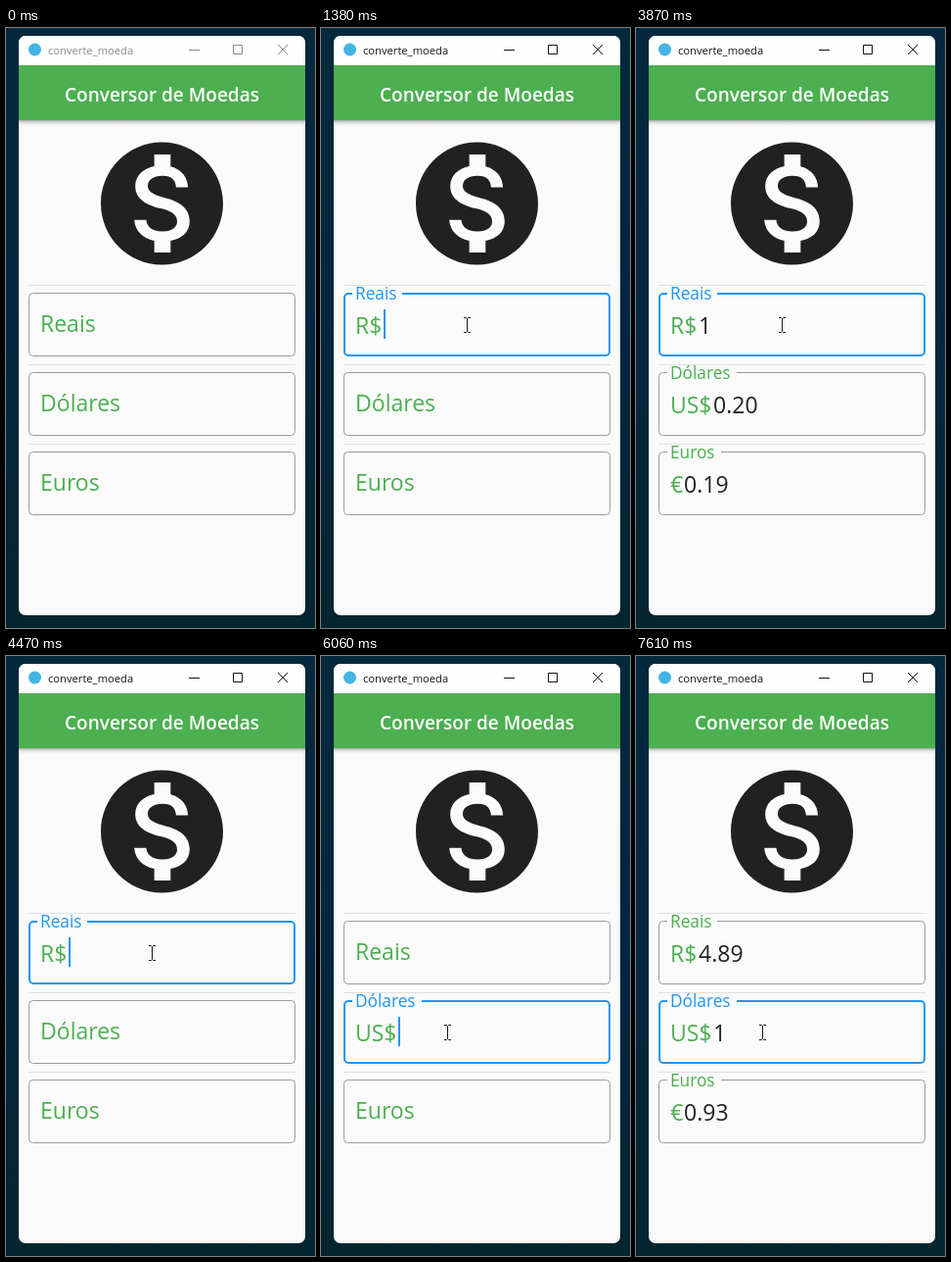
An HTML page for the animation above (8000 ms loop, 316 by 612 pixels).

```html
<!DOCTYPE html>
<html lang="pt">
<head>
<meta charset="utf-8">
<title>Conversor de Moedas</title>
<style>
  html, body { margin: 0; width: 100%; height: 100%; overflow: hidden; background: #05263b; }
  svg { display: block; width: 316px; height: 612px; }
  text { font-family: "Open Sans", "Noto Sans", sans-serif; white-space: pre; }
  .entry { font-size: 23px; }
</style>
</head>
<body>
<svg viewBox="0 0 316 612">
  <defs>
    <linearGradient id="desk" x2="0" y2="1">
      <stop stop-color="#06283c"/>
      <stop offset=".5" stop-color="#05263f"/>
      <stop offset="1" stop-color="#052530"/>
    </linearGradient>
    <linearGradient id="shade" x2="0" y2="1">
      <stop stop-color="#8a8f8a" stop-opacity=".8"/>
      <stop offset=".35" stop-color="#c0c4c0" stop-opacity=".5"/>
      <stop offset="1" stop-color="#f0f0f0" stop-opacity="0"/>
    </linearGradient>
    <clipPath id="frame"><rect x="13" y="8" width="293" height="591" rx="7"/></clipPath>
  </defs>

  <rect width="316" height="612" fill="url(#desk)"/>
  <g clip-path="url(#frame)">
    <rect x="13" y="8" width="293" height="591" fill="#fafafa"/>
    <rect x="13" y="8" width="293" height="30" fill="#fefefe"/>
    <rect x="13" y="38" width="293" height="56" fill="#4caf50"/>
    <rect x="13" y="94" width="293" height="7" fill="url(#shade)"/>
  </g>

  <circle cx="29.5" cy="22" r="6.5" fill="#43b4e4"/>
  <g id="chrome">
    <text x="43" y="27" font-size="11.2" fill="currentColor">converte_moeda</text>
    <path d="M187 22.5h11M232.5 17.5h9v9h-9zM278 17l10 10M288 17l-10 10" fill="none" stroke="currentColor"/>
  </g>
  <text x="159.5" y="75" font-size="19" font-weight="600" text-anchor="middle" fill="#fff">Conversor de Moedas</text>

  <path transform="translate(84.5 104) scale(6.25)" fill="#212121" d="M12 2C6.48 2 2 6.48 2 12s4.48 10 10 10 10-4.48 10-10S17.52 2 12 2zm1.41 16.09V20h-2.67v-1.93c-1.71-.36-3.16-1.46-3.27-3.4h1.96c.1 1.05.82 1.87 2.65 1.87 1.96 0 2.4-.98 2.4-1.59 0-.83-.44-1.61-2.67-2.14-2.48-.6-4.18-1.62-4.18-3.67 0-1.72 1.39-2.84 3.11-3.21V4h2.67v1.95c1.86.45 2.79 1.86 2.85 3.39H14.3c-.05-1.11-.64-1.87-2.22-1.87-1.5 0-2.4.68-2.4 1.64 0 .84.65 1.39 2.67 1.91s4.18 1.39 4.18 3.91c-.01 1.83-1.38 2.83-3.12 3.16z"/>
  <path d="M23 262.5h273M23 343.5h273M23 424.5h273" stroke="#dfdfe1"/>

  <g id="fields"></g>
  <rect id="caret" width="2" height="30" fill="#2196f3"/>
  <path id="beam" d="M-3.5 -7.5h2.5l1 1 1-1h2.5M0 -6.5v13M-3.5 7.5h2.5l1-1 1 1h2.5" fill="none" stroke="#161616"/>
  <path id="arrow" d="M0 0v16l3.8-3.6 2.5 5.8 2.4-1-2.5-5.7h5.2z" fill="#fff" stroke="#111"/>
</svg>

<script>
const LOOP = 8000, FADE = 200, BLINK = 500;
const CLICK_REAIS = 1095, TYPE_REAIS = 2370, ERASE = 4260, CLICK_DOLARES = 5830, TYPE_DOLARES = 6620;
const RESETS = [CLICK_REAIS, TYPE_REAIS, ERASE, CLICK_DOLARES, TYPE_DOLARES];
const GREEN = [76, 175, 80], BLUE = [33, 150, 243], GREY = [155, 155, 159];

// raised / focused: times at which the state flips; values: [from, to, text]
const FIELDS = [
  { label: 'Reais', prefix: 'R$', top: 270, valueX: 64, gap: 51,
    raised: [CLICK_REAIS, CLICK_DOLARES, TYPE_DOLARES], focused: [CLICK_REAIS, CLICK_DOLARES],
    values: [[TYPE_REAIS, ERASE, '1'], [TYPE_DOLARES, LOOP, '4.89']] },
  { label: 'Dólares', prefix: 'US$', top: 351, valueX: 79, gap: 71,
    raised: [TYPE_REAIS, ERASE, CLICK_DOLARES], focused: [CLICK_DOLARES],
    values: [[TYPE_REAIS, ERASE, '0.20'], [TYPE_DOLARES, LOOP, '1']] },
  { label: 'Euros', prefix: '€', top: 432, valueX: 49, gap: 55,
    raised: [TYPE_REAIS, ERASE, TYPE_DOLARES], focused: [],
    values: [[TYPE_REAIS, ERASE, '0.19'], [TYPE_DOLARES, LOOP, '0.93']] }
];

const MOUSE = [[250, 318, 430], [860, 149, 303], [5120, 149, 303], [5400, 129, 384]];

const $ = id => document.getElementById(id);
const clamp = v => Math.max(0, Math.min(1, v));
const lerp = (a, b, p) => a + (b - a) * p;
const mix = (a, b, p) => `rgb(${a.map((v, i) => Math.round(lerp(v, b[i], p)))})`;
const smooth = p => p * p * (3 - 2 * p);

// cubic-bezier(.4, 0, .2, 1)
function ease(x) {
  if (x <= 0 || x >= 1) return clamp(x);
  let lo = 0, hi = 1;
  for (let i = 0; i < 20; i++) {
    const s = (lo + hi) / 2, r = 1 - s;
    if (1.2 * r * r * s + .6 * r * s * s + s ** 3 < x) lo = s; else hi = s;
  }
  return smooth(lo);
}

function level(t, flips) {
  const past = flips.filter(f => f <= t);
  if (!past.length) return 0;
  const p = ease((t - past[past.length - 1]) / FADE);
  return past.length % 2 ? p : 1 - p;
}

function set(el, attrs) {
  for (const k in attrs) el.setAttribute(k, attrs[k]);
}

function add(parent, tag, attrs, text = '') {
  const el = document.createElementNS('http://www.w3.org/2000/svg', tag);
  set(el, attrs);
  el.textContent = text;
  return parent.appendChild(el);
}

for (const f of FIELDS) {
  const g = add($('fields'), 'g', {});
  f.border = add(g, 'path', { fill: 'none' });
  f.prefixEl = add(g, 'text', { class: 'entry', x: 35, y: f.top + 42, fill: `rgb(${GREEN})` }, f.prefix);
  f.valueEl = add(g, 'text', { class: 'entry', x: f.valueX, y: f.top + 42, fill: '#212121' });
  f.labelEl = add(g, 'text', { x: 35 }, f.label);
}

function outline(top, width, gap) {
  const i = width / 2, l = 23 + i, r = 296 - i, y = top + i, b = top + 65 - i, c = 4;
  const start = 32 + gap;
  return `M${start} ${y}H${r - c}a${c} ${c} 0 0 1 ${c} ${c}V${b - c}a${c} ${c} 0 0 1 ${-c} ${c}` +
    `H${l + c}a${c} ${c} 0 0 1 ${-c} ${-c}V${y + c}a${c} ${c} 0 0 1 ${c} ${-c}H32`;
}

function drawField(f, t) {
  const up = level(t, f.raised), focus = level(t, f.focused);
  const value = f.values.find(([from, to]) => t >= from && t < to);
  set(f.border, {
    d: outline(f.top, 1 + focus, up * f.gap),
    stroke: mix(GREY, BLUE, focus),
    'stroke-width': 1 + focus
  });
  set(f.labelEl, {
    y: lerp(f.top + 40, f.top + 7, up),
    'font-size': lerp(23, 17.25, up),
    fill: mix(GREEN, BLUE, focus)
  });
  f.prefixEl.setAttribute('opacity', up);
  f.valueEl.textContent = value ? value[2] : '';
}

function drawCaret(t) {
  const last = RESETS.filter(r => r <= t).pop();
  const on = last !== undefined && Math.floor((t - last) / BLINK) % 2 === 0;
  const f = FIELDS[t < CLICK_DOLARES ? 0 : 1];
  set($('caret'), {
    x: f.valueX + (f.valueEl.textContent ? 13 : 0),
    y: f.top + 17,
    opacity: on ? 1 : 0
  });
}

function drawMouse(t) {
  let [, x, y] = MOUSE[0];
  for (let i = 1; i < MOUSE.length; i++) {
    const [t0, x0, y0] = MOUSE[i - 1], [t1, x1, y1] = MOUSE[i];
    if (t < t0) break;
    const p = smooth(clamp((t - t0) / (t1 - t0)));
    x = lerp(x0, x1, p);
    y = lerp(y0, y1, p);
  }
  const shown = t >= MOUSE[0][0];
  const inField = x > 23 && x < 296 && FIELDS.some(f => y > f.top && y < f.top + 65);
  const at = `translate(${Math.round(x) + .5} ${Math.round(y)})`;
  set($('beam'), { transform: at, opacity: shown && inField ? 1 : 0 });
  set($('arrow'), { transform: at, opacity: shown && !inField ? 1 : 0 });
}

function render(t) {
  $('chrome').style.color = t < CLICK_REAIS ? '#8a8a8a' : '#151515';
  FIELDS.forEach(f => drawField(f, t));
  drawCaret(t);
  drawMouse(t);
}

const began = performance.now();
function tick() {
  render((performance.now() - began) % LOOP);
  requestAnimationFrame(tick);
}
tick();
</script>
</body>
</html>
```
